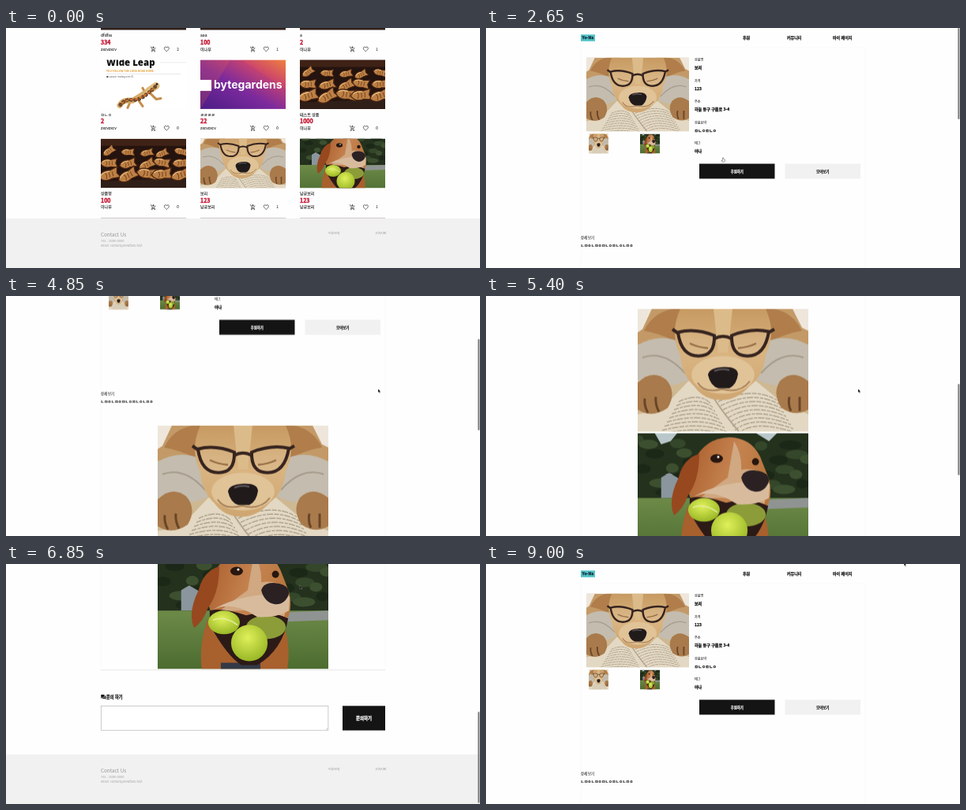
An HTML page for the animation above (9050 ms loop, 600x305 px).

```html
<!DOCTYPE html>
<html lang="ko">
<head>
<meta charset="utf-8">
<title>Shop walkthrough</title>
<style>
  html, body { margin: 0; width: 100%; height: 100%; overflow: hidden; background: #fefefe; }
  svg#stage { display: block; width: 100vw; height: 100vh; }
  text { font-family: "Noto Sans CJK KR", "Noto Sans CJK", "Noto Sans", sans-serif; fill: #222; white-space: pre; }
  #list, #detail, #page, #thumb, #bar, #cursor, #hand, #arrow { animation: 9.05s linear infinite; }
  #list { animation-name: leave; animation-timing-function: step-end; }
  #detail { animation-name: enter; animation-timing-function: step-end; }
  #page { animation-name: scroll; }
  #thumb { animation-name: thumb; }
  #bar { animation-name: bar; }
  #cursor { animation-name: move; }
  #hand { animation-name: hand; animation-timing-function: step-end; }
  #arrow { animation-name: arrow; animation-timing-function: step-end; }

  @keyframes leave { 0% { opacity: 1 } 24.31%, 100% { opacity: 0 } }
  @keyframes enter { 0% { opacity: 0 } 24.31%, 100% { opacity: 1 } }
  @keyframes scroll {
    0%, 47.51% { transform: translateY(0) }
    53.591% { transform: translateY(-142px) }
    65.193% { transform: translateY(-425px) }
    69.06%, 77.35% { transform: translateY(-488px) }
    92.82%, 100% { transform: translateY(0) }
  }
  @keyframes thumb {
    0%, 47.51% { transform: translateY(0) }
    53.591% { transform: translateY(54.6px) }
    65.193% { transform: translateY(163.5px) }
    69.06%, 77.35% { transform: translateY(187.7px) }
    92.82%, 100% { transform: translateY(0) }
  }
  @keyframes bar {
    0%, 29.6% { opacity: 1 }
    31.4%, 47.4% { opacity: 0 }
    47.6%, 95.5% { opacity: 1 }
    98%, 100% { opacity: 0 }
  }
  @keyframes move {
    0%, 1% { transform: translate(574px, 22px) }
    9.9%, 32.04% { transform: translate(300px, 165px) }
    39.78%, 69.06% { transform: translate(471px, 118px) }
    73.5%, 77.35% { transform: translate(372px, 27px) }
    95% { transform: translate(500px, 58px) }
    99.4%, 100% { transform: translate(529px, -2.5px) }
  }
  @keyframes hand { 0% { opacity: 0 } 8.5% { opacity: 1 } 32.04%, 100% { opacity: 0 } }
  @keyframes arrow { 0% { opacity: 0 } 1% { opacity: 1 } 8.5% { opacity: 0 } 32.04%, 100% { opacity: 1 } }
</style>
</head>
<body>
<svg id="stage" viewBox="0 0 600 305" preserveAspectRatio="none">
  <defs>
    <linearGradient id="violet" x1="0" y1="1" x2="1" y2="0">
      <stop offset="0" stop-color="#4b1c86"/><stop offset=".45" stop-color="#7d2a9c"/>
      <stop offset=".75" stop-color="#c8446f"/><stop offset="1" stop-color="#f08a3c"/>
    </linearGradient>
    <linearGradient id="fur" x1="0" y1="0" x2="0" y2="1">
      <stop offset="0" stop-color="#c79a62"/><stop offset=".5" stop-color="#d9b481"/><stop offset="1" stop-color="#cfa671"/>
    </linearGradient>
    <linearGradient id="coat" x1="0" y1="0" x2="1" y2=".3">
      <stop offset="0" stop-color="#a85c2b"/><stop offset=".6" stop-color="#c58350"/><stop offset="1" stop-color="#b9763f"/>
    </linearGradient>
    <linearGradient id="grass" x1="0" y1="0" x2="0" y2="1">
      <stop offset="0" stop-color="#6d8a48"/><stop offset="1" stop-color="#4c6c30"/>
    </linearGradient>
    <radialGradient id="ball" cx=".45" cy=".35" r=".7">
      <stop offset="0" stop-color="#dff05a"/><stop offset="1" stop-color="#94b322"/>
    </radialGradient>

    <symbol id="reader" viewBox="0 0 216 156" preserveAspectRatio="xMidYMid slice">
      <rect width="216" height="156" fill="#cdb892"/>
      <path d="M0 0H216V45H0z" fill="#c39a67"/>
      <path d="M0 0H18L6 26L0 30zM216 0H196L208 24L216 28z" fill="#eee6da"/>
      <path d="M8 28Q20 4 45 0H70L50 42Q24 30 8 28z" fill="#b07d4b"/>
      <path d="M208 28Q196 4 171 0H146L166 42Q192 30 208 28z" fill="#b07d4b"/>
      <path d="M0 46Q28 30 56 43L68 88Q40 106 0 92z" fill="#c4bcae"/>
      <path d="M216 46Q188 30 160 43L148 88Q176 106 216 92z" fill="#c4bcae"/>
      <path d="M6 62Q34 52 60 82M210 62Q182 52 156 82" fill="none" stroke="#a59b8b" stroke-width="2"/>
      <path d="M30 128L64 92H150L184 120L216 134V156H0V134z" fill="#e3d8c3"/>
      <g id="print" fill="none" stroke="#91866f" stroke-width="1" stroke-dasharray="6 1.5 4 1.2 8 1.4"></g>
      <path d="M96 113Q108 132 128 156" stroke="#b3a58c" stroke-width="2" fill="none"/>
      <path d="M54 0H162Q176 30 162 58Q160 84 142 98Q126 116 106 116Q84 116 72 99Q56 84 54 60Q40 30 54 0z" fill="url(#fur)"/>
      <path d="M96 0H120L114 56H102z" fill="#dcbb8a"/>
      <ellipse cx="108" cy="84" rx="40" ry="24" fill="#e0c397"/>
      <path d="M76 94Q84 108 107 102Q130 108 142 92" fill="none" stroke="#a98258" stroke-width="2"/>
      <path d="M89 84Q90 75 108 74T127 83Q125 97 116 101H102Q92 98 89 84z" fill="#211a1b"/>
      <path d="M97 79Q107 75 116 78" stroke="#575052" stroke-width="2.5" fill="none"/>
      <path d="M66 44Q76 49 89 50M127 50Q140 49 150 44" fill="none" stroke="#8e6236" stroke-width="2.500"/>
      <g fill="#fff" fill-opacity=".08" stroke="#36241f" stroke-width="4">
        <path d="M51 30Q72 24 97 34Q98 60 77 60Q55 60 51 30z"/>
        <path d="M166 29Q144 24 119 34Q118 60 139 60Q161 60 166 29z"/>
        <path d="M97 38Q108 32 119 38M51 31L44 26M166 30L173 26" fill="none"/>
      </g>
      <path d="M0 94Q18 76 36 90Q50 106 38 126Q18 140 0 128z" fill="#a97a4b"/>
      <path d="M216 92Q196 76 180 92Q170 108 182 126Q200 138 216 128z" fill="#a97a4b"/>
      <path d="M9 114Q8 124 13 132M23 112Q22 122 27 131M192 112Q190 122 194 130M205 112V130" stroke="#684627" stroke-width="3" fill="none"/>
    </symbol>

    <symbol id="fetch" viewBox="0 0 216 156" preserveAspectRatio="xMidYMid slice">
      <rect width="216" height="90" fill="#24311d"/>
      <path d="M22 0H50L42 10L30 14zM150 0H176L166 10z" fill="#b9c7ca"/>
      <g id="leaves"></g>
      <path d="M30 56L40 50L52 57V82H30z" fill="#8a959d"/>
      <path d="M0 82H216V156H0z" fill="url(#grass)"/>
      <path d="M166 84L216 82V94L160 96z" fill="#8f9492"/>
      <path d="M64 92L162 108Q168 132 164 156H56Q52 124 64 92z" fill="#a8602d"/>
      <path d="M80 148H130V156H80z" fill="#343947"/>
      <path d="M72 34Q86 6 116 5Q144 6 155 30L166 58Q172 84 160 98L72 92Q56 68 72 34z" fill="url(#coat)"/>
      <path d="M78 26Q58 32 52 56Q38 84 46 104Q58 96 64 78Q78 60 78 26z" fill="#97481f"/>
      <path d="M122 10Q132 26 131 46Q158 42 166 64L160 90Q112 76 74 86Q94 70 114 56z" fill="#d0a881"/>
      <path d="M66 82Q82 78 112 88Q140 80 165 92Q158 132 126 151H106Q88 140 66 100z" fill="#2c1a17"/>
      <ellipse cx="84" cy="97" rx="20" ry="15" fill="url(#ball)"/>
      <ellipse cx="137" cy="103" rx="25" ry="15" fill="#8c9c38"/>
      <circle cx="116" cy="123" r="23" fill="url(#ball)"/>
      <path d="M70 94Q84 88 101 100" stroke="#e3ec9c" stroke-width="1.5" fill="none"/>
      <path d="M68 82Q94 68 126 90Q148 92 166 82L167 64L130 62Q94 66 68 82z" fill="#d8bb9d"/>
      <ellipse cx="100" cy="32" rx="8" ry="5.500" fill="#28160f"/>
      <ellipse cx="149" cy="36" rx="4.500" ry="4.500" fill="#28160f"/>
      <path d="M131 56Q134 46 149 47Q166 49 166 60Q162 74 149 74Q135 72 131 56z" fill="#2b2123"/>
      <circle cx="102" cy="30" r="1.500" fill="#fff"/>
    </symbol>

    <symbol id="fish" viewBox="-14 -8 28 16" overflow="visible">
      <path d="M-12 0Q-7 -8 3 -5L12 -7L10 0L13 6L3 5Q-7 8 -12 0z" fill="#bd8146" stroke="#4b2512" stroke-width="1.2"/>
      <path d="M-4 -4Q-1 0 -4 4M1 -3V3M5 -3V3" fill="none" stroke="#7b451f" stroke-width="1"/>
      <path d="M-9 -2Q-5 -5 2 -4" fill="none" stroke="#e3b87c" stroke-width="1.300"/>
    </symbol>
    <symbol id="pastry" viewBox="0 0 108 62.5" preserveAspectRatio="xMidYMid slice">
      <rect width="108" height="62.5" fill="#24130e"/>
      <path d="M0 0H108V9H0z" fill="#3f2216"/>
      <path d="M0 54L108 50V62.500H0z" fill="#2f1f18"/>
      <g id="tray"></g>
    </symbol>

    <symbol id="lizard" viewBox="0 0 108 62.5">
      <rect width="108" height="62.5" fill="#fff"/>
      <text x="7" y="8" font-size="11.5" font-weight="800" style="font-family:'Open Sans',sans-serif;fill:#111">Wide Leap</text>
      <path d="M75 3.5H108" stroke="#ddd" stroke-width=".6"/>
      <text x="7" y="15.2" font-size="3.3" font-weight="700" style="fill:#e79a2c">YOU FOLLOW THE LONG ROAD HOME</text>
      <path d="M7 18H101" stroke="#ccc" stroke-width=".5"/>
      <text x="7" y="22.5" font-size="2.8" style="fill:#555">● sample reading note 01</text>
      <g fill="none" stroke-linecap="round" stroke-linejoin="round">
        <path d="M37 54L34 61M46 49L53 59M57 43L53 36M62 42L70 50L76 49" stroke="#c58d4b" stroke-width="3"/>
        <path d="M24 58Q28 50 40 52Q52 45 61 39" stroke="#d7ad6b" stroke-width="7"/>
        <path d="M61 39L70 33" stroke="#dfbd7b" stroke-width="9"/>
        <path d="M25 57Q30 50 41 51T70 33" stroke="#6d4a31" stroke-width="5" stroke-dasharray=".1 5"/>
        <path d="M27 55Q32 51 43 50T68 35" stroke="#d77229" stroke-width="2" stroke-dasharray="2 4"/>
      </g>
      <circle cx="71" cy="31" r="1.3" fill="#222"/>
    </symbol>

    <symbol id="banner" viewBox="0 0 108 62.5">
      <rect width="108" height="62.5" fill="url(#violet)"/>
      <path d="M52 0L108 36V0zM0 62.5L38 0H0z" fill="#e8604a" fill-opacity=".22"/>
      <rect y="25.5" width="14" height="14" fill="#fff"/>
      <text x="17" y="36.5" font-size="14" font-weight="700" style="font-family:Inter,sans-serif;fill:#fff">bytegardens</text>
    </symbol>

    <symbol id="cart" viewBox="0 0 24 24">
      <path d="M1 3H4L8.5 13H16L20 5.5M8 13L6 17H19M12 1V9M8 5H16" fill="none" stroke="#222" stroke-width="2"/>
      <circle cx="7" cy="20.5" r="2" fill="#222"/><circle cx="17" cy="20.5" r="2" fill="#222"/>
    </symbol>
    <symbol id="heart" viewBox="0 0 24 24">
      <path d="M12 20.5C5 14 3 11.5 3 8.5A4.7 4.7 0 0 1 12 6A4.7 4.7 0 0 1 21 8.5C21 11.5 19 14 12 20.5z" fill="none" stroke="#222" stroke-width="2"/>
    </symbol>
  </defs>

  <g id="list"></g>
  <g id="detail">
    <rect width="600" height="305" fill="#fefefe"/>
    <g id="page"></g>
    <g id="bar"><rect id="thumb" x="597.3" y="0" width="2.2" height="116" rx="1.1" fill="#808080"/></g>
  </g>
  <g id="cursor">
    <path id="arrow" d="M0 0V4.6L1.1 3.7L1.9 5.4L2.7 5L1.9 3.4H3.3z" fill="#111" stroke="#fff" stroke-width=".2"/>
    <path id="hand" d="M-.6 0Q0 -1 .6 0V1.5L2.5 2.2V4L1.8 5.2H-.8L-2 3.2L-.6 3.4z" fill="#fff" stroke="#333" stroke-width=".45"/>
  </g>
</svg>

<script>
const $ = id => document.getElementById(id);

// Text placed by its vertical centre; a hairline outline keeps tiny glyphs dark.
function text(x, y, value, size = 5, weight = 400, fill = '#222', anchor = 'start') {
  const outline = size * (weight >= 600 ? .05 : .02);
  return `<text x="${x}" y="${y + size * .36}" font-size="${size}" font-weight="${weight}" text-anchor="${anchor}" ` +
    `stroke="${fill}" stroke-width="${outline}" style="fill:${fill}">${value}</text>`;
}
const use = (id, x, y, w, h) => `<use href="#${id}" x="${x}" y="${y}" width="${w}" height="${h}"/>`;
const box = (x, y, w, h, fill, extra = '') => `<rect x="${x}" y="${y}" width="${w}" height="${h}" fill="${fill}" ${extra}/>`;
const button = (x, y, w, h, label, fill, ink, size) =>
  box(x, y, w, h, fill) + text(x + w / 2, y + h / 2, label, size, 700, ink, 'middle');
// The whole photo squeezed into a square.
const preview = (id, x, y, side) =>
  `<g transform="translate(${x} ${y}) scale(${side / 216} ${side / 156})">${use(id, 0, 0, 216, 156)}</g>`;
const repeat = (n, make) => Array.from({ length: n }, (_, i) => make(i)).join('');

function footer(y) {
  return box(0, y, 600, 63, '#f2f1f1') +
    text(120, y + 21, 'Contact Us', 6.3, 400, '#a5a5a5') +
    text(120, y + 28.3, 'TEL : 0000-0000', 4, 400, '#b3b3b3') +
    text(120, y + 34.5, 'email: contact@nowhere.test', 3.8, 400, '#b3b3b3') +
    text(408, y + 19, '이용안내', 3.9, 400, '#aaa') +
    text(467, y + 19, '고객지원', 3.9, 400, '#aaa');
}

function card([image, name, price, seller, likes], i) {
  const x = 120 + i % 3 * 126, y = -60 + Math.floor(i / 3) * 100.4;
  return use(image, x, y, 108, 62.5) +
    text(x, y + 69.3, name) +
    text(x, y + 78.5, price, 7, 700, '#c4122f') +
    text(x, y + 86.8, seller) +
    use('cart', x + 62.5, y + 83, 8, 8) + use('heart', x + 79.3, y + 83, 8, 8) +
    text(x + 97.5, y + 87, likes, 4.6, 400, '#333', 'middle');
}

const products = [
  ['pastry', 'dfdfss', 334, 'zxcvzxcv', 2],
  ['pastry', 'aaa', 100, '이나무', 1],
  ['pastry', 'a', 2, '이나무', 1],
  ['lizard', 'ㅁㄴㅇ', 2, 'zxcvzxcv', 0],
  ['banner', 'ㄹㄹㄹㄹ', 22, 'zxcvzxcv', 0],
  ['pastry', '테스트 상품', 1000, '이나무', 0],
  ['pastry', '상품명', 100, '이나무', 0],
  ['reader', '보리', 123, '남궁보리', 1],
  ['fetch', '남궁보리', 123, '남궁보리', 1],
];
const fields = [
  ['상품명', '보리'], ['가격', '123'], ['주소', '하늘 동구 구름로 3-4'],
  ['상품요약', 'ㅁㄴㅇㅁㄴㅇ'], ['태그', '아나'],
];

$('print').innerHTML = repeat(9, i => {
  const y = 112 + i * 5.2;
  return `<path d="M${52 - i * 3} ${y + 6}Q78 ${y - 6} ${92 + i * 3} ${y + 8}M${102 + i * 3} ${y + 6}Q146 ${y - 14} ${176 + i * 3} ${y + 4}"/>`;
});
$('leaves').innerHTML = repeat(36, i => {
  const x = i * 67 % 216, y = 8 + i * 29 % 68;
  return `<ellipse cx="${x}" cy="${y}" rx="${8 + i % 4 * 2}" ry="6" fill="${['#34472a', '#1b2817', '#3c5030'][i % 3]}"/>`;
});
$('tray').innerHTML = repeat(15, i => {
  const row = Math.floor(i / 5), size = .75 + row * .2;
  const x = 10 + i % 5 * 22 + i * 7 % 5, y = 16 + row * 14 + i * 5 % 4;
  return `<g transform="translate(${x} ${y}) rotate(${-35 + i * 37 % 50}) scale(${size})">${use('fish', -13, -8, 26, 16)}</g>`;
});

$('list').innerHTML = box(0, 0, 600, 305, '#fefefe') + products.map(card).join('') +
  [120, 246, 372].map(x => box(x, 241, 108, .8, '#c4c0bd')).join('') + footer(242);

$('page').innerHTML =
  box(120, 622, 360, 1.2, '#e6e6e6') +
  box(119.8, 25, 360.4, 597, '#fefefe', 'stroke="#f8f8f8" stroke-width=".7"') +
  box(120, 8.3, 18, 8.5, '#50c2c6') + text(129, 12.5, 'Yo-Na', 5, 600, '#123', 'middle') +
  text(325, 12.5, '후원', 5, 600) + text(381, 12.5, '커뮤니티', 5, 600) + text(439, 12.5, '마이 페이지', 5, 600) +
  use('reader', 127, 37.8, 130, 93.5) + preview('reader', 130, 134.5, 25) + preview('fetch', 195, 134.5, 25) +
  fields.map(([label, value], i) =>
    text(264, 41 + i * 26.5, label, 4.1) + text(264, 50.4 + i * 26.5, value, 5, 600, '#111')).join('') +
  button(270, 172.5, 95.5, 19, '후원하기', '#141414', '#fff', 4.4) +
  button(378.5, 172.5, 95.5, 19, '모아보기', '#f1f1f1', '#222', 4.4) +
  text(120, 266.5, '상세 보기', 4.3) +
  text(120, 276.3, 'ㄴㅁㅇㄴㅁㅇㅁㄴㅇㅁㄴㅇㄴㅁㅇ', 4.8, 600) +
  use('reader', 192, 307, 216, 155.5) + use('fetch', 192, 465, 216, 156.5) +
  '<path d="M120.3 654H124.5V657.5H121.7L120.3 659z" fill="#111"/>' +
  '<path d="M125 655.5H126.3V660.3L125 659H121.8V658.1H125z" fill="#111"/>' +
  text(127, 657, '문의 하기', 5.2, 700) +
  box(120.3, 668.4, 287.6, 30.8, '#fff', 'stroke="#aaa" stroke-width=".6"') +
  '<path d="M405.5 698.5L407.3 696.7" stroke="#777" stroke-width=".5"/>' +
  button(426, 668.3, 54, 31.2, '문의하기', '#141414', '#fff', 5.5) +
  footer(730);
</script>
</body>
</html>
```
